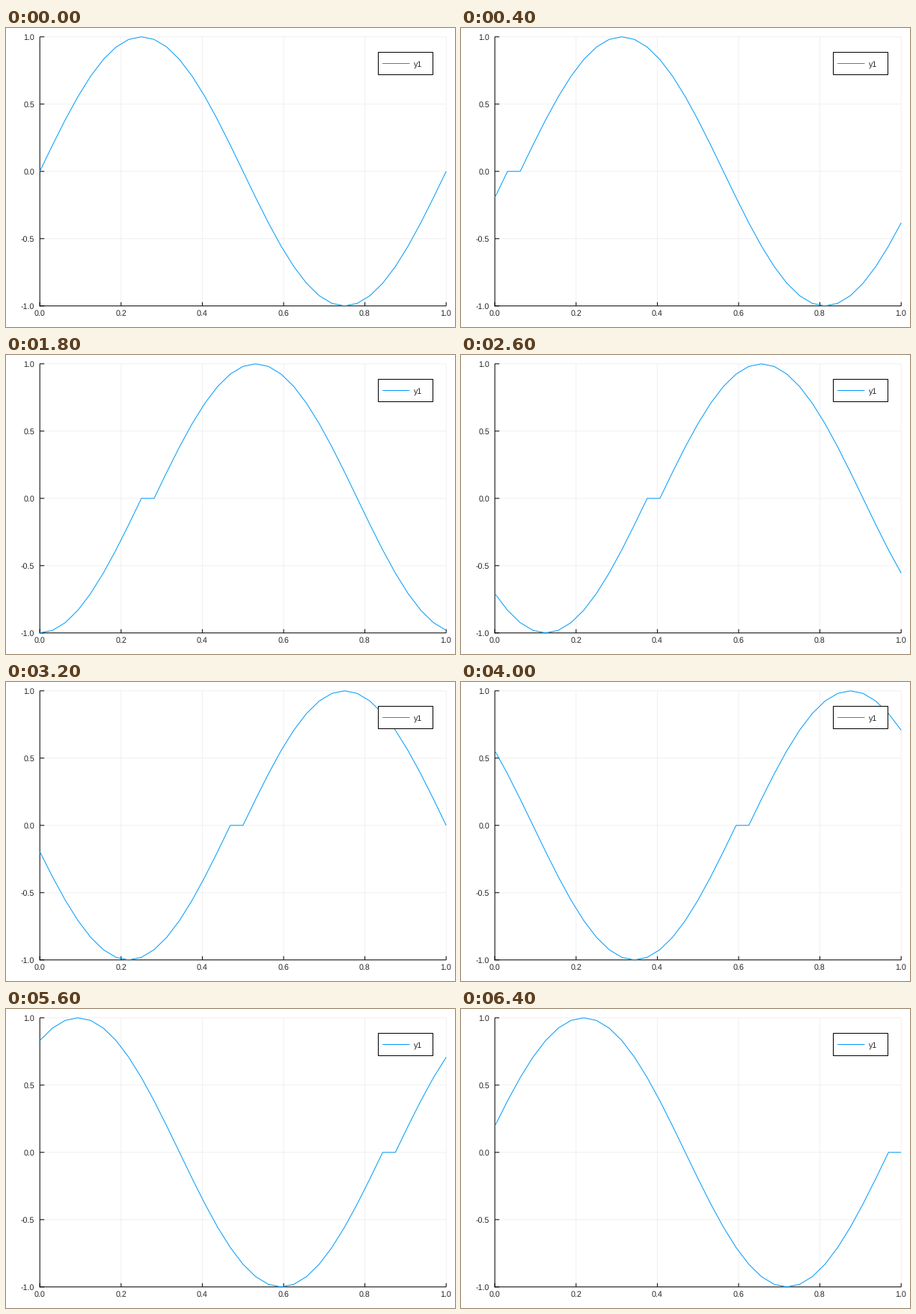
A matplotlib script that plays this animation: 600 by 400 pixels, repeating every 6600 ms.

```python
import numpy as np
import matplotlib.pyplot as plt
from matplotlib.animation import FuncAnimation
from matplotlib.patches import Rectangle

W, H, DPI = 600, 400, 100
PX = 72 / DPI  # points per pixel
LEFT, RIGHT, TOP, BOTTOM = 45.2, 588.2, 11.8, 371.8
BLUE = "#009afa"
GRID = "#f0f0f0"
INK = "#262626"
STEPS = 33

plt.rcParams["font.family"] = "Liberation Sans"
plt.rcParams["text.hinting"] = "none"
plt.rcParams["path.snap"] = False  # keep lines at their exact positions

fig = plt.figure(figsize=(W / DPI, H / DPI), dpi=DPI, facecolor="white")
ax = fig.add_axes([0, 0, 1, 1])
ax.set_xlim(0, W)
ax.set_ylim(H, 0)
ax.axis("off")


def to_x(u):
    return LEFT + u * (RIGHT - LEFT)


def to_y(v):
    return BOTTOM - (v + 1) / 2 * (BOTTOM - TOP)


def line(xs, ys, color="black", z=2):
    return ax.plot(xs, ys, color=color, lw=PX, zorder=z,
                   solid_capstyle="butt", solid_joinstyle="round")[0]


def label(x, y, text, align):
    ax.text(x, y, text, ha=align, va="baseline", color=INK,
            fontsize=10.67 * PX, zorder=6)


# Grid, ticks and tick labels
for u in np.linspace(0, 1, 6):
    x = to_x(u)
    line([x, x], [TOP, BOTTOM], GRID, 1)
    line([x, x], [BOTTOM, BOTTOM - 5])
    label(x - 0.2, 385, f"{u:.1f}", "center")

for v in np.linspace(-1, 1, 5):
    y = to_y(v)
    line([LEFT, RIGHT], [y, y], GRID, 1)
    line([LEFT, LEFT + 6], [y, y])
    label(38.3, y + 4.2, f"{v:.1f}", "right")

# Axes
line([LEFT, LEFT], [TOP, BOTTOM + 0.5])
line([LEFT - 0.5, RIGHT], [BOTTOM, BOTTOM])

# Legend
ax.add_patch(Rectangle((497.5, 32.5), 73, 30, facecolor="white",
                       edgecolor="black", lw=PX, zorder=4))
line([503, 539.5], [47.5, 47.5], BLUE, 5)
label(545, 52, "y1", "left")

u = np.linspace(0, 1, STEPS)
wave = np.sin(2 * np.pi * u)
curve = line(to_x(u), to_y(wave), BLUE, 3)


def update(i):
    # Both end samples are zero, so the rotated wave has a flat step
    curve.set_ydata(to_y(np.roll(wave, i)))
    return [curve]


anim = FuncAnimation(fig, update, frames=STEPS, interval=200,
                     repeat=True, repeat_delay=0, blit=False)
plt.show()
```
